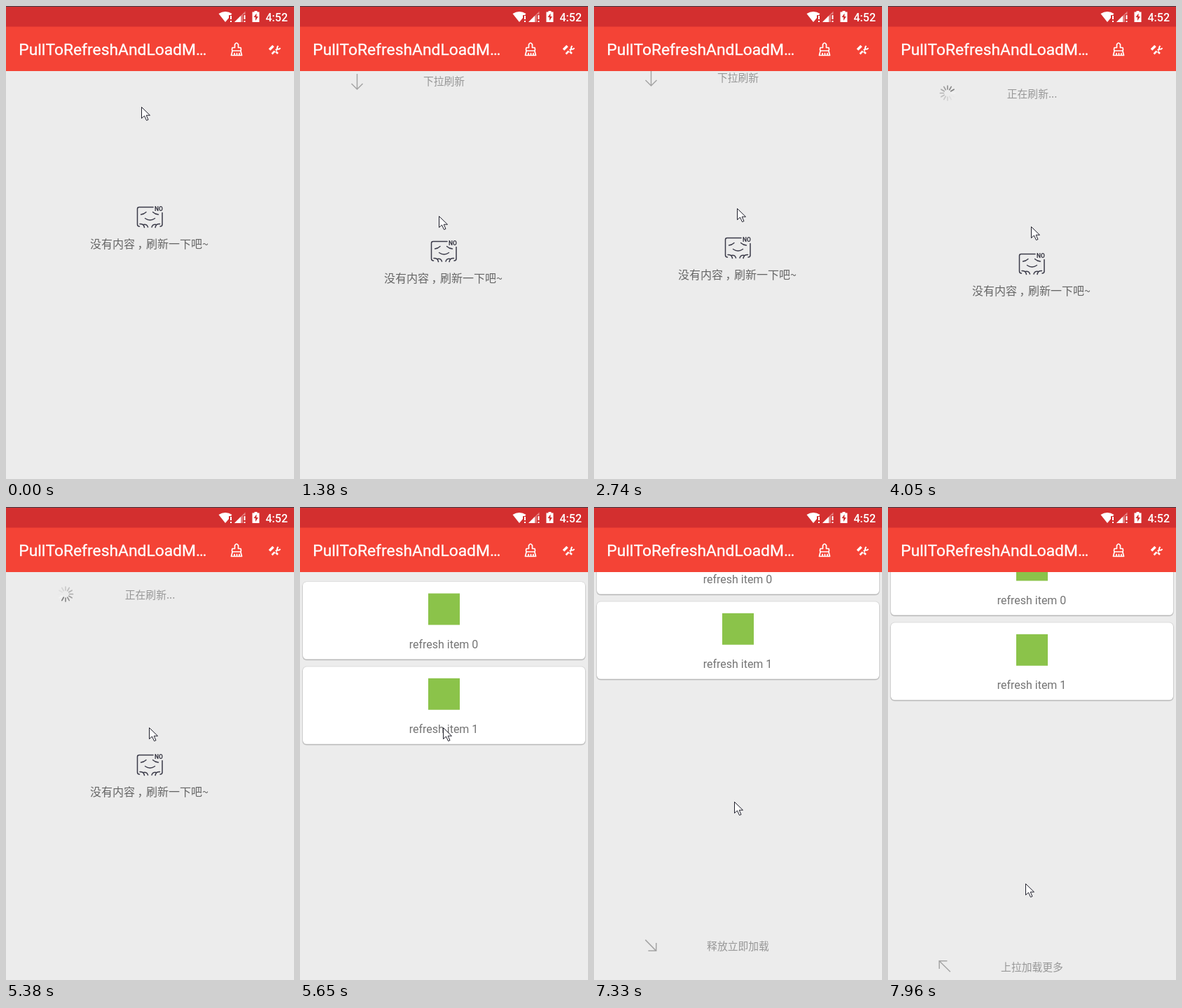
Write an HTML page that moves like this. It is 411 px wide and 676 px high and loops after 8000 ms.

```html
<!DOCTYPE html>
<html lang="zh-CN">
<head>
<meta charset="utf-8">
<title>Pull to refresh</title>
<style>
  html, body { margin: 0; width: 100%; height: 100%; overflow: hidden; background: #ececec; }
  svg { display: block; width: 100vw; height: 100vh; }
  text { font-family: Roboto, "Noto Sans CJK SC", "Noto Sans CJK", sans-serif; }
  .cjk { font-family: "Noto Sans CJK SC", "Noto Sans CJK", "Noto Sans", sans-serif; }
  .hint { font-size: 14.8px; fill: #979797; text-anchor: middle; }
  .label { font-size: 16px; fill: #747474; text-anchor: middle; }
  .arrow { fill: none; stroke: #a5a5a5; stroke-width: 1.5; }
  .line { fill: none; stroke-linecap: round; stroke-linejoin: round; }
</style>
</head>
<body>
<svg viewBox="0 0 411 676">
  <defs>
    <path id="arrow" d="M0 11V-11M-8 -3L0 -11L8 -3"/>
    <g id="card">
      <rect x="3" y="106" width="405" height="113.500" rx="6.500" fill="#000" opacity=".05"/>
      <rect x="3.500" y="107" width="404" height="112" rx="6" fill="#000" opacity=".17"/>
      <rect x="4" y="107" width="403" height="110.500" rx="5.500" fill="#fff"/>
      <rect x="183" y="123.500" width="45" height="45" fill="#8bc34a"/>
    </g>
  </defs>
  <rect width="411" height="676" fill="#ececec"/>

  <g id="header">
    <use id="downArrow" href="#arrow" class="arrow"/>
    <g id="spinner" transform="translate(85 57.500)" stroke-width="1.7" stroke-linecap="round"></g>
    <text id="headText" class="hint cjk" x="205.500" y="64"></text>
  </g>

  <g id="empty">
    <g class="line" stroke="#3a3a48" stroke-width="1.500">
      <path d="M210 287.500H190Q187.500 287.500 187.500 290V312Q187.500 315 190.500 315M223 295.500V312Q223 315 220 315"/>
      <path d="M191 311.500Q196.500 311 197.500 316.500M196 312.500Q201 311 202.500 316M219.500 311.500Q214 311 213 316.500M214.500 312.500Q209.500 311 208 316"/>
      <path d="M192.500 298Q197 297.500 200 294.500M209.500 294.500Q212.500 297.500 217.500 298M198.500 303.500Q205.500 308.500 212.500 303.500" stroke-width="1.300"/>
    </g>
    <text x="212" y="292.500" font-size="8.500" font-weight="700" fill="#33333f">NO</text>
    <text class="cjk" x="120" y="346" font-size="16" fill="#666">没有内容<tspan dx="3.500">，</tspan><tspan dx="-3.500">刷新一下吧~</tspan></text>
  </g>

  <g id="list">
    <use href="#card"/>
    <text class="label" x="205" y="201.500">refresh item 0</text>
    <use href="#card" y="121.300"/>
    <text class="label" x="205" y="322.800">refresh item 1</text>
  </g>

  <g id="footer">
    <use id="upArrow" href="#arrow" class="arrow"/>
    <text id="footText" class="hint cjk" x="205.500" y="725.500"></text>
  </g>

  <rect y="29" width="411" height="64" fill="#f44336"/>
  <rect width="411" height="29.500" fill="#d32f2f"/>
  <rect width="411" height="1" fill="#3c3d47"/>
  <text x="18.300" y="70" font-size="22.830" fill="#fff" stroke="#fff" stroke-width=".300">PullToRefreshAndLoadM…</text>
  <text x="370.500" y="21.700" font-size="16" font-weight="500" fill="#fff">4:52</text>

  <g fill="#fff">
    <path d="M303.500 11Q313 5 322.500 11L321 13H318V17L313 23Z"/>
    <path d="M320 14h2v5h-2zM320 21h2v2h-2z"/>
    <path d="M326 23L341.500 7.500V12H338V23Z" opacity=".4"/>
    <path d="M326 23L335 14V23Z"/>
    <path d="M339.500 13h2v6h-2zM339.500 21h2v2h-2z"/>
    <path d="M354.500 7H358.500V8.500H361.500V23H351.500V8.500H354.500Z"/>
  </g>
  <path d="M357.500 10.500L353.500 16H356V21L360 15H357.500Z" fill="#d32f2f"/>

  <g class="line" stroke="#fff" stroke-width="1.700">
    <path d="M326.500 59.500V55Q329 50.500 331.500 55V59.500H335Q336 62 335 64H323Q322 62 323 59.500ZM323 64.500L321.500 70.500H336.500L335 64.500M326 70V67.500M329.500 70V67.500M333 70V67.500"/>
  </g>
  <g class="line" stroke="#fff" style="stroke-linecap: butt">
    <path d="M376 62.500L381.500 57" stroke-width="3.500"/>
    <path d="M379.500 68.500L383.500 64.500M385 63.500L387 61.500M385 65L388 68" stroke-width="2.500"/>
    <path d="M388.500 57Q386 59.500 387.500 61.500Q390 62.500 391.500 60" stroke-width="1.800"/>
  </g>

  <path id="cursor" d="M0 0V16L4 12.500L7 19L9.500 18L6.700 11.700H12Z" fill="#fff" stroke="#20202c"/>
</svg>
<script>
const LOOP = 8000;
const REFRESH = 3590, LOADED = 5470, HEADER = 67;
const $ = id => document.getElementById(id);

const clamp = x => Math.max(0, Math.min(1, x));
const ramp = (t, a, b) => clamp((t - a) / (b - a));
const hump = (t, a, b) => Math.sin(Math.PI * ramp(t, a, b));

// The screen updates about every 133 ms while something moves.
const bursts = [[990, 1780], [2080, 3160], [REFRESH, 5650], [5810, 7090], [7210, 7960]];

function snap(t) {
  const burst = bursts.findLast(([a]) => t >= a);
  if (!burst) return 0;
  const [a, b] = burst;
  const gap = (b - a) / Math.round((b - a) / 133);
  return Math.min(b, a + gap * Math.floor((t - a) / gap + 0.12));
}

// Each gesture moves the pointer and, with resistance, the content.
function gestures(t) {
  const down = ramp(t, 810, 1780);
  const back = ramp(t, 2000, 2750);
  const again = ramp(t, 2750, 3100);
  const nudge = hump(t, 5700, 6420);
  const reach = ramp(t, 6450, 6900);
  const up = hump(t, 6995, 8171);

  const held = 83 * down - 39 * back + 33 * again;
  const header = t < REFRESH ? held : HEADER * (1 - ramp(t, LOADED, 5650));
  return {
    offset: Math.round(header - 20 * nudge - 118 * up),
    x: 193 + 8.4 * down + 2.6 * back - 8 * ramp(t, 6700, 7960),
    y: 144 + 263 * down - 118 * back + 26 * again
      - 50 * nudge + 312 * reach - 261 * up + 50 * ramp(t, 7583, 7960)
  };
}

// Moments when a pull crosses the release threshold.
const headFlips = [1600, 2200, 2900];
const footFlips = [7222, 7848];
const turn = (flips, t) => flips.reduce((sum, f) => sum + 180 * ramp(t, f, f + 150), 0);
const released = (flips, t) => flips.filter(f => t >= f).length % 2 === 1;

const show = (el, on) => el.setAttribute("display", on ? "inline" : "none");
const place = (el, x, y, r = 0) => el.setAttribute("transform", `translate(${x} ${y}) rotate(${r})`);

const spokes = Array.from({ length: 12 }, (_, i) => {
  const spoke = document.createElementNS("http://www.w3.org/2000/svg", "path");
  spoke.setAttribute("d", "M0 -5.5V-10.5");
  spoke.setAttribute("transform", `rotate(${i * 30})`);
  $("spinner").append(spoke);
  return spoke;
});

function spin(t) {
  const lead = Math.floor((t - REFRESH) * 12 / 1000) + 10;
  spokes.forEach((spoke, i) => {
    const age = (lead - i + 24) % 12;
    const v = Math.round(128 + age * 10.5);
    spoke.setAttribute("stroke", `rgb(${v},${v},${v})`);
  });
}

function draw(time) {
  const t = snap(time);
  const { offset, x, y } = gestures(t);
  const busy = t >= REFRESH;
  const loaded = t >= LOADED;

  for (const id of ["header", "empty", "list", "footer"]) place($(id), 0, offset);
  show($("header"), offset > 0);
  show($("empty"), !loaded);
  show($("list"), loaded);
  show($("footer"), loaded && offset < 0);

  show($("downArrow"), !busy);
  show($("spinner"), busy);
  if (busy) spin(t);
  place($("downArrow"), 81.5, 59, 180 + turn(headFlips, t));
  $("headText").textContent = busy ? "正在刷新..." : released(headFlips, t) ? "释放立即刷新" : "下拉刷新";

  place($("upArrow"), 81, 719.5, turn(footFlips, t));
  $("footText").textContent = released(footFlips, t) ? "释放立即加载" : "上拉加载更多";

  place($("cursor"), Math.round(x) + 0.5, Math.round(y) + 0.5);
}

const start = performance.now();
function tick() {
  draw((performance.now() - start) % LOOP);
  requestAnimationFrame(tick);
}
tick();
</script>
</body>
</html>
```
